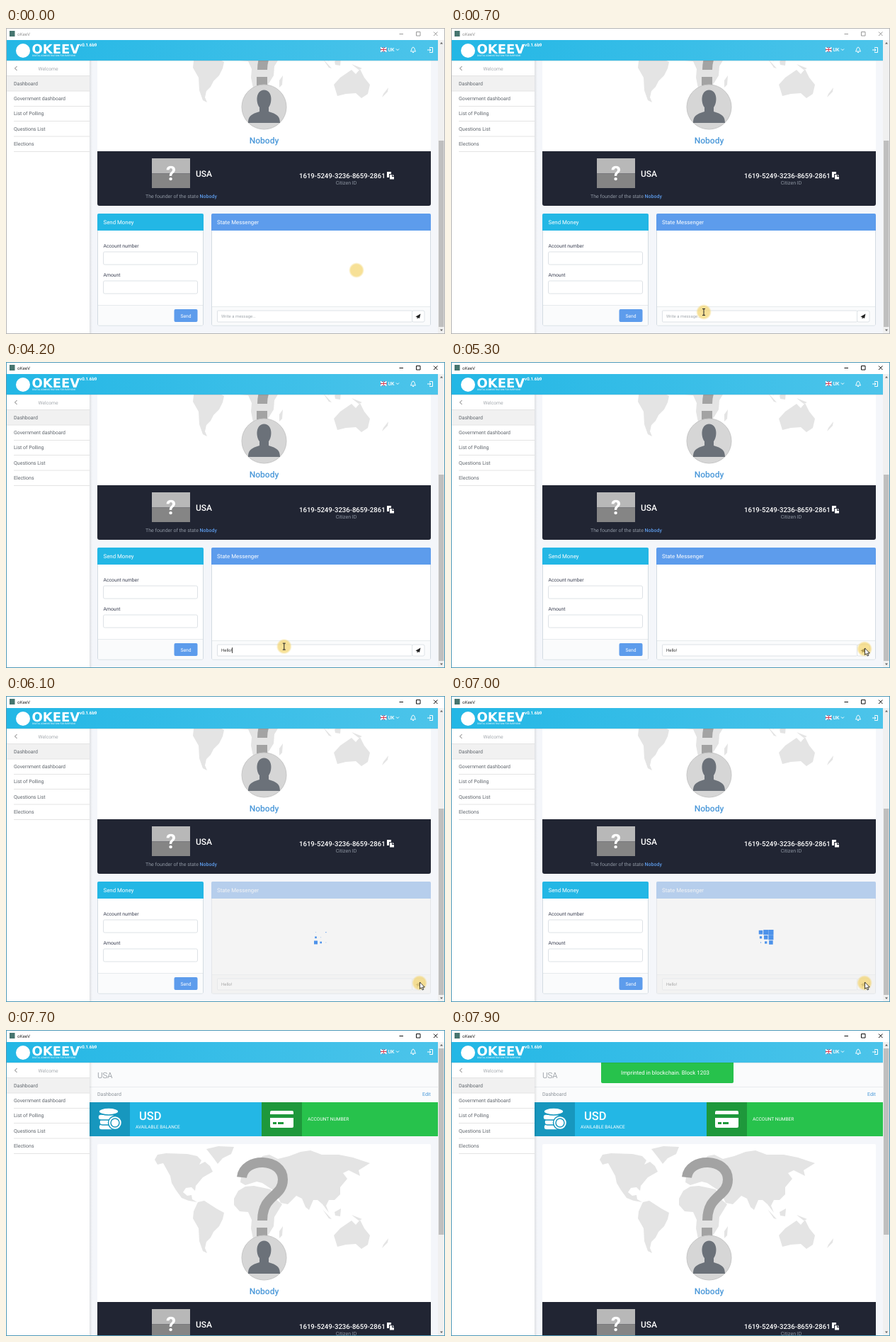
Write an HTML page that moves like this. It is 620 px wide and 432 px high and loops after 8000 ms.

```html
<!DOCTYPE html>
<html lang="en">
<head>
<meta charset="utf-8">
<title>Dashboard</title>
<style>
html, body { margin: 0; width: 100%; height: 100%; overflow: hidden; background: #fff; }
svg { display: block; width: 620px; height: 432px; }
text { font-family: Roboto, sans-serif; font-size: 7px; text-rendering: geometricPrecision; white-space: pre; }
.mid { text-anchor: middle; }
.big { font-size: 7.85px; }
.line { fill: none; stroke-width: 1; }
.box { fill: #fff; stroke: #dde2e6; stroke-width: 1; }
.card { fill: #fff; stroke: #d3dbe2; stroke-width: 1; }
</style>
</head>
<body>
<svg viewBox="0 0 620 432">
  <defs>
    <linearGradient id="sky"><stop stop-color="#23b7e5"/><stop offset="1" stop-color="#4cc4ea"/></linearGradient>
    <linearGradient id="shade"><stop stop-color="#000" stop-opacity=".09"/><stop offset="1" stop-color="#000" stop-opacity="0"/></linearGradient>
    <radialGradient id="glow"><stop offset=".75" stop-color="#f3d266" stop-opacity=".68"/><stop offset="1" stop-color="#f3d266" stop-opacity="0"/></radialGradient>
    <clipPath id="view"><path d="M118 46H610V432H118z"/></clipPath>
  </defs>
  <rect width="620" height="432" fill="#fff"/>

  <g clip-path="url(#view)">
    <rect x="118" y="46" width="492" height="386" fill="#f4f6fa"/>
    <g id="page">
      <path d="M118 46H610V102H118z" fill="#fafbfc"/>
      <path d="M118 80.5H610" stroke="#e8ebee"/>
      <text x="129" y="68" fill="#7a8088" style="font-size:11.4px;font-weight:300">USA</text>
      <text x="129" y="93" fill="#8b9299">Dashboard</text>
      <text x="588" y="93" fill="#4a98d9">Edit</text>
      <path d="M118 102H361V150H118z" fill="#23b7e5"/>
      <path d="M118 102H175V150H118z" fill="#1797be"/>
      <path d="M361 102H610V150H361z" fill="#27c24c"/>
      <path d="M361 102H418V150H361z" fill="#1e983b"/>
      <g fill="#fff" stroke="#1797be" stroke-width="1.5">
        <rect x="131" y="133" width="23" height="8" rx="4"/>
        <rect x="132" y="126" width="24" height="8" rx="4"/>
        <rect x="130" y="119" width="23" height="8" rx="4"/>
        <ellipse cx="145" cy="115" rx="14" ry="5"/>
        <circle cx="154" cy="131" r="9.5"/>
        <circle cx="154" cy="131" r="6" fill="none"/>
      </g>
      <rect x="373" y="114" width="33" height="24" rx="2" fill="#fff"/>
      <path d="M373 119H406V124H373zM377 130H382V133H377zM384 130H392V133H384z" fill="#1e983b"/>
      <g fill="#fff">
        <text x="188" y="127" style="font-size:16.5px;font-weight:500">USD</text>
        <text x="183" y="139" style="font-size:6.45px">AVAILABLE BALANCE</text>
        <text x="426" y="128" style="font-size:6.6px">ACCOUNT NUMBER</text>
      </g>

      <rect x="129" y="161" width="471" height="230" rx="2" fill="#fff"/>
      <g fill="#e4e4e4">
        <path d="M210 183L214 176 226 174 256 175 270 178 276 184 273 190 281 186 288 192 292 200 278 208 268 220 267 227 262 222 254 223 250 229 256 234 262 233 263 239 270 243 258 241 248 237 240 226 234 216 232 206 222 188 214 190z"/>
        <path d="M283 168L300 164 322 165 318 175 306 181 299 189 294 182z"/>
        <path d="M271 243L280 241 297 252 308 258 306 267 301 277 293 285 289 293 283 299 281 308 284 315 278 312 273 298 272 280 264 266 265 256z"/>
        <path d="M328 227L338 221 350 220 374 225 380 238 390 246 379 264 378 277 370 290 362 304 353 307 349 295 346 280 347 268 342 257 330 256 322 247 322 238z"/>
        <path d="M331 215L332 207 340 203 344 196 352 193 362 178 372 176 384 182 400 178 416 172 430 170 446 176 470 176 490 180 514 188 498 198 500 206 484 198 476 202 482 210 472 222 472 232 464 240 456 240 452 248 456 258 447 246 440 240 434 240 428 254 423 250 418 238 410 234 398 246 388 244 380 228 362 216 354 214 338 219z"/>
        <path d="M463 290L472 280 488 269 494 275 500 268 506 280 514 290 511 303 502 309 494 302 480 303 468 306z"/>
        <path d="M386 284L391 277 390 290 386 294zM533 303L540 294 539 300 531 308zM447 253L460 267 456 266zM464 257L473 252 472 263 465 262zM488 261L503 267 498 269z"/>
      </g>
      <path d="M333 208C336 179 391 180 391 211C391 236 362 232 362 269" fill="none" stroke="#a3a3a3" stroke-width="14"/>
      <path d="M354 279H369V291H354z" fill="#a3a3a3"/>

      <g transform="translate(0 210)">
        <circle cx="364.5" cy="111.500" r="31.500" fill="#d6d6d6" stroke="#c6c6c6"/>
        <path d="M342 134C342 122 350 121 358 118V112C353 106 352 88 364.500 87.500C377 88 376 106 371 112V118C379 121 387 122 387 134z" fill="#6b7179"/>
        <text class="mid" x="364.500" y="163" fill="#4a98d9" style="font-size:12px;font-weight:500">Nobody</text>

        <path d="M129 174H600V248Q600 251 597 251H132Q129 251 129 248z" fill="#212533"/>
        <path d="M206 184H260V205.500H206z" fill="#b8b8b8"/>
        <path d="M206 205.500H260V226H206z" fill="#858585"/>
        <g fill="#fff">
          <text class="mid" x="233" y="215" style="font-size:28px;font-weight:700">?</text>
          <text x="268" y="210" style="font-size:12px;font-weight:500">USA</text>
          <text x="414" y="211.500" style="font-size:9.6px;font-weight:500">1619-5249-3236-8659-2861</text>
          <path d="M538 203H544V206H541V211H538zM542 207H545V210H548V213.500H542zM546 206.500L548 209H546z"/>
        </g>
        <text x="197" y="239.500" fill="#8f97a3">The founder of the state <tspan fill="#5d9cec" font-weight="500">Nobody</tspan></text>
        <text class="mid" x="480.500" y="221" fill="#8f97a3">Citizen ID</text>

        <rect class="card" x="129.500" y="262.500" width="149" height="157.500" rx="2"/>
        <path d="M129 286V264Q129 262 131 262H277Q279 262 279 264V286z" fill="#23b7e5"/>
        <path d="M130 391H278V419.500H130z" fill="#fafbfc"/>
        <path d="M130 391.500H278" stroke="#e6eaed"/>
        <text class="big" x="137.500" y="276.500" fill="#fff">Send Money</text>
        <g fill="#3a3f51" style="font-size:6.8px">
          <text x="137.500" y="310" style="font-size:6.8px">Account number</text>
          <text x="137.500" y="350.500" style="font-size:6.8px">Amount</text>
        </g>
        <rect class="box" x="137.500" y="316" width="133" height="18" rx="2"/>
        <rect class="box" x="137.500" y="357" width="133" height="18" rx="2"/>
        <rect x="237.500" y="397" width="33" height="18" rx="2" fill="#5d9cec"/>
        <text class="mid" x="254" y="408.500" fill="#fff" style="font-size:6.7px">Send</text>

        <rect class="card" x="290.500" y="262.500" width="309" height="157.500" rx="2"/>
        <path d="M290 286V264Q290 262 292 262H598Q600 262 600 264V286z" fill="#5d9cec"/>
        <path d="M291 393H599V419.500H291z" fill="#fafbfc"/>
        <path d="M291 393.500H599" stroke="#e6eaed"/>
        <text class="big" x="298" y="276.500" fill="#fff">State Messenger</text>
        <rect class="box" x="573.500" y="399" width="17.500" height="16" rx="2"/>
        <rect class="box" id="field" x="298.500" y="399" width="275" height="16" rx="1"/>
        <path d="M578.500 407.500L585.500 403.500 584 410 582 409 580.800 411 580.500 408.300z" fill="#222"/>
        <text id="msg" x="304" y="409" style="font-size:5.95px"></text>
        <path id="caret" d="M0 403V411" stroke="#111" stroke-width=".8"/>
        <g id="busy">
          <rect x="290" y="262" width="310" height="158.500" fill="#eee" fill-opacity=".62"/>
          <g id="cubes" fill="#4d92ea"></g>
        </g>
      </g>
    </g>
    <g id="alert">
      <rect x="212" y="44" width="187" height="31" rx="2" fill="#27c24c"/>
      <text class="mid" x="302.500" y="63" fill="#fff" style="font-size:7.9px">Imprinted in blockchain. Block 1203</text>
    </g>
  </g>

  <path d="M0 46H118V432H0z" fill="#fff"/>
  <path d="M118 46H122V432H118z" fill="url(#shade)"/>
  <path d="M0 67H118V89H0z" fill="#f1f1f1"/>
  <path d="M0 67.500H118M0 89H118M11 110.500H118M11 131.500H118M11 153H118M11 174.500H118" stroke="#e4e4e4"/>
  <path class="line" d="M15.500 54L12.500 57 15.500 60" stroke="#777"/>
  <text x="45.500" y="59.500" fill="#a6abb0" style="font-size:6.8px">Welcome</text>
  <g id="menu" fill="#5f656c"></g>

  <path d="M0 17H610V46H0z" fill="url(#sky)"/>
  <path d="M0 46.500H610" stroke="#000" stroke-opacity=".08"/>
  <path id="bar" d="M0 46.500H44" stroke="#2f80e7" stroke-width="1.500"/>
  <g fill="#fff">
    <circle cx="24" cy="32" r="10"/>
    <text x="36.500" y="36" style="font:bold 18px 'DejaVu Sans',sans-serif">OKEEV</text>
    <text x="37" y="40" style="font-size:3.2px">DIGITAL ADMINISTRATION FOR EVERYONE</text>
    <text x="104" y="25.500" style="font-size:6.2px;font-weight:700">v0.1.6b9</text>
    <text x="539.500" y="33" style="font-weight:500">UK</text>
  </g>
  <path d="M529 27.500H537.500V33.500H529z" fill="#34508f"/>
  <path d="M529 27.500L537.500 33.500M537.500 27.500L529 33.500M533.250 27.500V33.500M529 30.500H537.500" stroke="#fff" stroke-width="1.800"/>
  <path d="M533.250 27.500V33.500M529 30.500H537.500" stroke="#d8324a"/>
  <g class="line" stroke="#fff">
    <path d="M551 29.500L553 31.500 555 29.500M571.500 33C573 31.500 572.500 27.500 575 27C577.500 27.500 577 31.500 578.500 33zM574 34.500H576M598 27.500H602.500V34.500H598M595 31H600M598 29L600 31 598 33"/>
  </g>

  <path d="M610 17H620V432H610z" fill="#f0f0f0"/>
  <path d="M613 22.500L615 20 617 22.500zM613 425.500L615 428 617 425.500z" fill="#606060"/>
  <rect id="thumb" x="611" width="7.500" height="263" fill="#bfbfbf"/>

  <path d="M0 0H620V16.500H0z" fill="#fff"/>
  <path d="M5 4H12.500V12H5z" fill="#46756f"/>
  <g id="chrome">
    <text x="16" y="11" style="font:6.1px 'Open Sans',sans-serif">oKeeV</text>
    <path class="line" stroke="currentColor" d="M555.500 8.500H561M579.500 5.500H585V11H579.500zM604 5.500L609.500 11M609.500 5.500L604 11"/>
  </g>
  <rect id="frame" x=".5" y=".5" width="619" height="431" fill="none"/>

  <g id="cursor">
    <circle r="11" fill="url(#glow)"/>
    <path id="beam" class="line" d="M-2 -4.500H2M0 -4.500V4.500M-2 4.500H2" stroke="#222" stroke-width=".9"/>
    <path id="arrow" d="M.5 -1V8.500L2.700 6.500 4.200 10 5.800 9.200 4.300 6H7.300z" fill="#fff" stroke="#111" stroke-width=".8"/>
  </g>
</svg>
<script>
const $ = id => document.getElementById(id);
const NS = 'http://www.w3.org/2000/svg';
const set = (el, attrs) => { for (const k in attrs) el.setAttribute(k, attrs[k]); return el; };
const add = (parent, tag, attrs) => parent.appendChild(set(document.createElementNS(NS, tag), attrs));
const show = (id, on) => { $(id).style.display = on ? '' : 'none'; };
const clamp = x => Math.max(0, Math.min(1, x));
const ramp = (t, a, b) => clamp((t - a) / (b - a));
const ease = x => x * x * (3 - 2 * x);

const LOOP = 8000, SCROLL = 210;
const FOCUS = 1100, BLUR = 5200, SEND = 5360, DONE = 7300, RELOAD = 7700;
const KEYS = [2500, 2700, 3100, 3200, 3500, 4100];

['Dashboard', 'Government dashboard', 'List of Polling', 'Questions List', 'Elections'].forEach((label, i) => {
  add($('menu'), 'text', { x: 11, y: 80.5 + i * 21.4 }).textContent = label;
});

const cubes = [];
for (let row = 0; row < 3; row++)
  for (let col = 0; col < 3; col++)
    cubes.push({ el: add($('cubes'), 'rect', {}), x: 437.5 + col * 7.2, y: 348 - row * 7.2, delay: (row + col) * 100 });

// Each cube shrinks to nothing and grows back, then rests.
function cubeScale(ms) {
  const p = Math.max(0, ms) % 1300 / 1300;
  return p < .35 ? 1 - ease(p / .35) : ease(clamp((p - .35) / .35));
}

function drawMessage(t) {
  const typed = KEYS.filter(k => t >= k);
  const msg = $('msg');
  const text = typed.length ? 'Hello!'.slice(0, typed.length) : 'Write a message...';
  if (msg.textContent !== text) msg.textContent = text;
  set(msg, { fill: typed.length ? '#333' : '#a3a9ae' });

  const since = t - Math.max(FOCUS, ...typed);
  show('caret', t >= FOCUS && t < BLUR && since % 1060 < 530);
  const x = 304.4 + (typed.length ? msg.getComputedTextLength() : 0);
  set($('caret'), { transform: `translate(${x} 0)` });
  set($('field'), { stroke: t >= FOCUS && t < SEND ? '#66afe9' : '#dde2e6' });
}

function drawCursor(t) {
  const a = ease(ramp(t, 50, 700)), b = ease(ramp(t, 4000, 4800));
  const x = 495 - 138 * a + 227 * b, y = 342 + 59 * a + 4 * b;
  const overField = y > 398 && x < 573;
  show('cursor', t < DONE);
  show('beam', overField);
  show('arrow', !overField && t >= 100);
  set($('cursor'), { transform: `translate(${x} ${y})` });
}

function draw(t) {
  const active = t >= 1000, top = t >= RELOAD;
  $('chrome').style.color = active ? '#111' : '#999';
  set($('chrome'), { fill: active ? '#111' : '#888' });
  set($('frame'), { stroke: active ? '#4f9ab8' : '#b5b5b5' });

  set($('page'), { transform: `translate(0 ${top ? 0 : -SCROLL})` });
  set($('thumb'), { y: top ? 26 : 159 });
  drawMessage(t);
  drawCursor(t);

  show('busy', t >= SEND && t < DONE);
  set($('busy'), { opacity: ramp(t, SEND, SEND + 200) });
  for (const c of cubes) {
    const s = 7.2 * cubeScale(t - SEND - c.delay);
    set(c.el, { x: c.x - s / 2, y: c.y - s / 2, width: s, height: s });
  }

  show('bar', t >= 7500 && t < RELOAD);
  set($('bar'), { d: `M0 46.5H${44 * ramp(t, 7480, 7600)}` });
  show('alert', top);
  set($('alert'), { transform: `translate(0 ${-30 * (1 - ease(ramp(t, RELOAD, 7880)))})` });
}

const start = performance.now();
function tick() {
  draw((performance.now() - start) % LOOP);
  requestAnimationFrame(tick);
}
tick();
</script>
</body>
</html>
```
